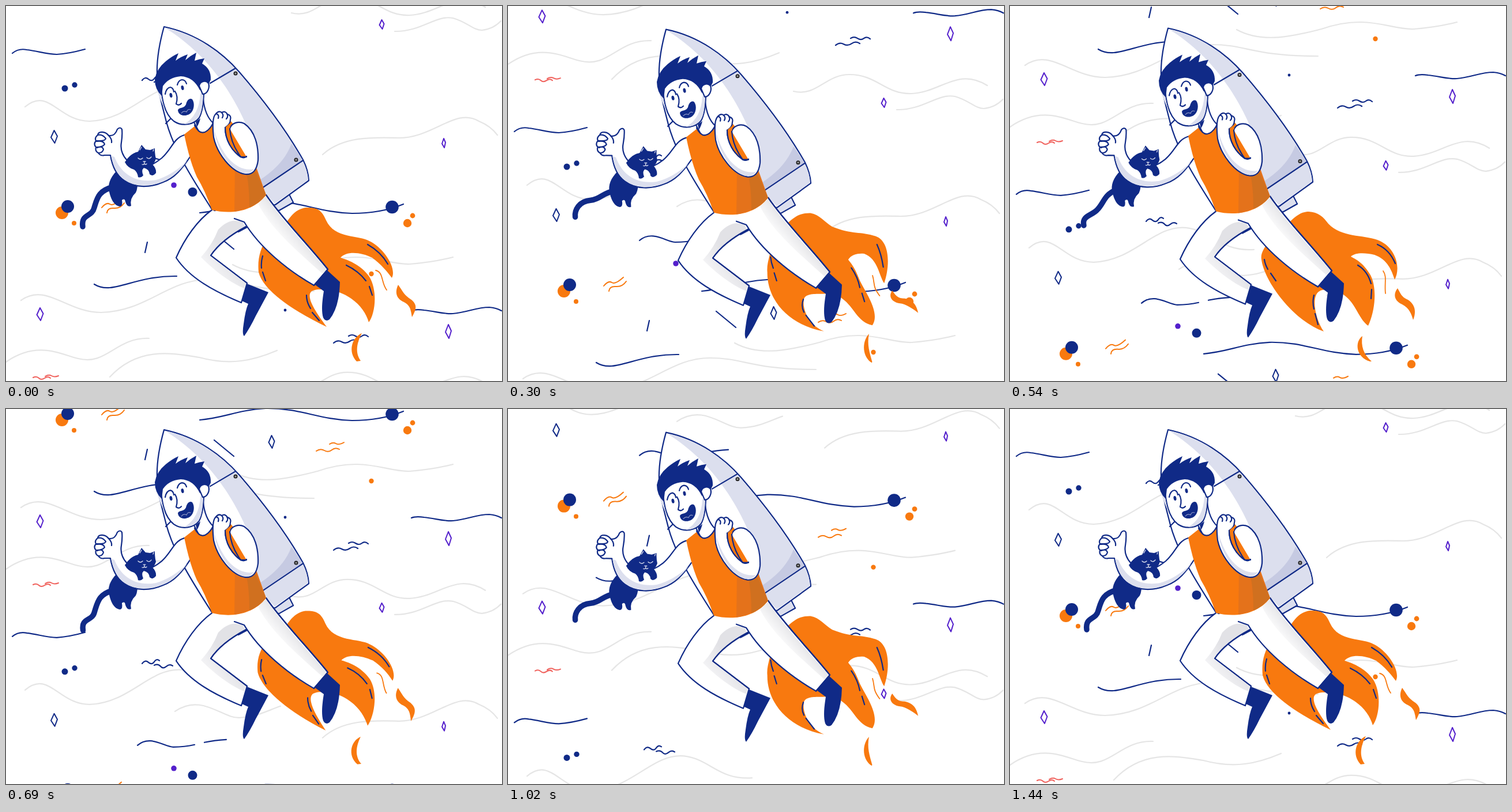
An HTML page for the animation above (1.47 s loop, 860x651 px).

```html
<!DOCTYPE html>
<html lang="en">
<head>
<meta charset="utf-8">
<title>Rocket rider</title>
<style>
  html, body { margin: 0; width: 100%; height: 100%; overflow: hidden; background: #fff; }
  svg { display: block; width: 860px; height: 651px; }
  path { stroke-linecap: round; stroke-linejoin: round; }
  .line { fill: none; stroke: #102a87; stroke-width: 2.2; }
  .skin { fill: #fff; stroke: #102a87; stroke-width: 2.2; }
  .navy { fill: #102a87; }
  .orange { fill: #f8790f; }
  .shade { fill: #dcdfee; }
  .grey { fill: none; stroke: #e5e5e5; stroke-width: 2.2; }
</style>
</head>
<body>
<svg viewBox="0 0 860 651">
  <defs>
    <linearGradient id="shin" gradientUnits="userSpaceOnUse" x1="502" y1="388" x2="476" y2="410">
      <stop stop-color="#e4e4e7"/><stop offset="1" stop-color="#fff"/>
    </linearGradient>
    <linearGradient id="knee" gradientUnits="userSpaceOnUse" x1="392" y1="440" x2="360" y2="465">
      <stop stop-color="#e2e2e6"/><stop offset="1" stop-color="#f3f3f5"/>
    </linearGradient>
  </defs>
  <g id="sky">
    <g id="tile">
      <path class="grey" d="M0 618C55 580 95 605 125 612C175 625 190 575 248 577
        M180 644C230 590 290 603 335 610C390 625 430 615 470 598
        M26 511C70 480 105 532 165 532C245 530 280 475 350 475C410 475 420 495 534 495
        M33 175C75 140 90 200 145 200C215 198 250 135 305 140C350 145 365 182 423 178
        M293 212C340 180 375 225 405 223C435 222 455 210 476 203
        M549 258C585 225 640 228 680 229C740 230 780 175 820 200Q840 208 852 224
        M495 12C535 22 550 -17 592 -17C640 -17 655 18 700 16C750 14 780 -30 831 2
        M674 44C720 45 745 15 775 21C800 28 810 42 825 42Q845 40 858 26
        M393 449C440 475 500 458 540 448C620 420 660 450 700 448Q740 445 775 436"/>
      <path class="line" d="M11 82Q22 73 36 76C55 78 70 84 88 84Q108 83 137 75
        M153 483C185 503 220 468 296 469
        M228 271C250 252 275 274 290 274Q310 274 327 270M344 266Q362 262 382 261
        M336 359C380 355 400 342 450 339C510 338 540 358 600 360Q650 360 689 344
        M703 529Q710 526 725 528C745 530 757 535 775 534C800 532 815 523 838 523Q850 524 859 529
        M245 410L241 428M361 394L395 422
        M236 129q5 -7 11 -2t10 -1t9 -2M257 132q7 -3 11 2t10 0t11 -1
        M568 585q7 -6 14 -2t14 -1t14 0M594 573q6 -4 12 0t11 0t11 1"/>
      <path fill="none" stroke="#f0625d" stroke-width="2" d="M47 645q6 -3 10 1t10 0t10 0M68 643q6 -4 11 -1t12 0"/>
      <path fill="none" stroke="#f8790f" stroke-width="2" d="M538 413q7 -5 14 -1t13 -1t13 -1M561 401q6 -4 11 -1t14 -2
        M166 350q8 -10 14 -6t20 -9M175 359q1 -9 12 -8t18 -9"/>
    </g>
  </g>

  <g class="orange">
    <path data-morph="flame"/><path data-morph="dropRight"/><path data-morph="dropLow"/>
  </g>
  <path data-morph="spark" fill="none" stroke="#f8790f" stroke-width="1.8"/>
  <path data-morph="dashes" class="line"/>

  <g data-bob>
    <path class="skin" d="M403 392L396 384L490 325L498 341Z"/>
    <path class="shade" d="M489 328L497 341L474 355L462 345Z"/>
    <path class="skin" d="M274 36C332 48 376 82 404 114C448 165 489 221 515 267Q524 285 525 303L467 345L357 353C325 303 291 250 278 201C264 145 252 115 274 36Z"/>
    <path class="shade" d="M276 38C332 49 375 83 403 115C447 166 488 222 514 268Q523 285 524 302L466 343L425 300L420 215C402 170 360 90 276 38Z"/>
    <path fill="#c6cae2" d="M495 239L514 267L446 313L440 302Q482 275 495 239Z"/>
    <path class="line" d="M354 134L398 108M515 268L444 316M277 204L289 192M498 341L470 357"/>
    <g fill="#999" stroke="#222" stroke-width="1.8"><circle cx="398" cy="117" r="2.6"/><circle cx="503" cy="267" r="2.6"/></g>

    <path class="navy" d="M415 481L455 497Q439 527 433 538Q423 559 413 573Q409 570 412 552Q415 528 420 517L407 511Z"/>
    <path class="navy" d="M556 458L579 479Q578 523 561 544Q554 549 550 541C546 528 549 508 551 495L536 484Z"/>
    <path fill="#fff" d="M357 350L451 325L440 380L396 382Z"/>
    <path class="skin" d="M357 354C332 372 310 403 295 437C318 472 360 495 408 515L418 481L355 433Q373 406 416 383"/>
    <path fill="url(#knee)" d="M354 433L416 481L413 490C392 482 364 462 338 436Q358 414 368 388Q390 365 411 376L414 383Q374 404 354 433Z"/>
    <path class="line" d="M418 481L355 433Q373 406 416 383"/>
    <path class="skin" d="M396 369L413 375C440 420 490 460 534 485L558 457C520 410 480 370 451 328"/>
    <path fill="url(#shin)" d="M451 330C475 368 515 410 556 457L549 465C506 426 458 386 437 343Z"/>
    <path class="line" d="M534 485L558 457C520 410 480 370 451 328"/>
  </g>

  <path data-morph="tail" fill="none" stroke="#102a87" stroke-width="9.5"/>
  <g id="arm">
    <path class="navy" d="M196 282C183 294 177 306 178 318C181 334 187 347 198 348Q203 347 201 337Q206 333 207 340Q210 350 217 347Q214 334 225 324Q229 316 228 300Z"/>
    <path class="navy" d="M205 272Q218 253 230 254L240 283L222 290Z"/>
    <path class="skin" d="M309 224C290 230 288 248 270 264C246 284 225 284 210 268Q197 254 200 237Q202 224 201 214Q198 209 193 214C190 223 184 226 178 225C172 217 160 217 159 224Q153 229 156 234Q151 240 156 245Q154 252 160 255Q164 261 171 259L181 259C184 277 190 293 205 303C225 317 252 315 272 306C292 299 306 282 319 262"/>
    <path class="shade" d="M182 260C186 278 192 292 206 302C225 315 252 313 272 305C290 298 303 284 314 269Q288 294 260 302C225 308 200 292 188 262Z"/>
    <path class="line" d="M159 224Q167 222 173 230Q172 235 157 234M157 235Q169 233 171 240Q168 245 157 245M158 246Q167 242 169 249Q167 255 161 255M178 225Q184 231 183 237"/>
    <path class="navy" d="M206 271Q218 255 229 253L235 241L242 249L250 250L258 247Q258 258 260 265Q258 272 254 275Q261 282 260 290Q254 297 249 292Q248 283 239 281Q234 285 238 294Q234 299 229 297Q228 288 222 284Q211 281 206 271Z"/>
    <path class="line" style="stroke:#dcdfee;stroke-width:1.3" d="M229 264q4 4 8 0M244 263q4 4 8 -1M238 270h4M240 271v3q-2 2 -4 1m4 -1q2 2 4 0M232 250l3 -5M255 252l1 -3"/>
  </g>

  <g data-bob>
    <path class="skin" d="M342 162Q345 190 359 203Q350 224 335 219L326 202Z"/>
    <path class="navy" d="M329 201L337 195Q335 204 331 210Z"/>
    <path class="orange" d="M309 223L328 208Q341 231 358 206L390 200L414 230L434 288L451 328C428 358 388 362 357 354Q345 320 331 297Q318 268 309 223Z"/>
    <path fill="#e4721b" d="M397 280H434L451 328Q428 352 396 357Z"/>
    <path fill="#d0701f" d="M416 287L433 287L451 328Q439 343 422 350Q422 310 416 287Z"/>
    <path class="line" d="M327 207Q340 233 358 206"/>

    <path class="skin" d="M388 213C391 203 403 199 413 204C432 217 438 243 437 268C435 284 429 293 415 292C390 288 366 256 360 228C358 210 358 192 364 187Q369 181 374 185Q380 181 384 188Q391 190 389 197Q389 206 380 211C380 232 391 251 407 262L417 262"/>
    <path class="shade" d="M361 215C365 250 388 284 411 290Q424 292 430 283Q407 288 385 264Q369 244 361 215Z"/>
    <path class="orange" d="M380 211L390 202L388 213C389 229 396 247 407 262C391 251 380 232 380 211Z"/>
    <path class="line" d="M388 213C389 229 396 247 407 262M380 211C380 232 391 251 407 262Q413 265 417 261M364 187q6 1 4 8M374 185q4 4 1 9M383 187q3 5 -1 9"/>

    <path class="skin" d="M268 135C270 160 274 187 291 200C306 210 326 206 335 194Q342 181 343 151L330 118H285Z"/>
    <path class="shade" d="M337 152L342 151Q341 184 334 193Q324 205 309 205Q335 190 337 152Z"/>
    <path class="shade" d="M261 142L269 151Q270 164 275 178Q266 162 261 142Z"/>
    <path class="navy" d="M270 156Q258 145 258 127Q261 109 277 96Q288 87 299 82L294 95Q303 88 315 84L311 94Q320 86 330 81L327 95Q335 92 344 91L340 100Q356 109 355 128L350 138L336 146Q325 123 303 122Q282 124 272 139Z"/>
    <path class="skin" d="M335 139C336 131 346 128 351 134C354 142 349 153 341 153Z"/>
    <path class="line" d="M276 153Q278 142 285 141Q290 142 291 149M297 137Q299 129 305 128Q311 128 313 135M293 148Q299 157 295 170Q300 174 304 169"/>
    <g class="navy">
      <ellipse cx="286" cy="155" rx="2.4" ry="4" transform="rotate(-12 286 155)"/>
      <ellipse cx="306" cy="142" rx="2.4" ry="4" transform="rotate(-12 306 142)"/>
      <path d="M298 181C300 175 308 179 312 171C314 162 319 159 323 162C328 169 326 182 319 187C310 193 299 190 298 181Z"/>
    </g>
    <path fill="none" stroke="#8d97c6" stroke-width="1.2" d="M304 186Q308 181 313 184Q315 178 320 180"/>
  </g>
</svg>

<script>
const NAVY = '#102a87', ORANGE = '#f8790f', PURPLE = '#5420cc';
const STEP = 30, LOOP = 1470, SCROLL = 13.6, TILE = SCROLL * 48;
const $ = q => document.querySelector(q);
const $$ = q => [...document.querySelectorAll(q)];

function add(parent, name, attrs) {
  const el = document.createElementNS('http://www.w3.org/2000/svg', name);
  for (const key in attrs) el.setAttribute(key, attrs[key]);
  return parent.appendChild(el);
}
const dot = (cx, cy, r, fill) => add($('#tile'), 'circle', { cx, cy, r, fill });
const diamond = (x, y, w, h, stroke) => add($('#tile'), 'path', {
  d: `M${x} ${y - h}L${x + w} ${y - 1}L${x + 1} ${y + h}L${x - w} ${y + 1}Z`,
  fill: 'none', stroke, 'stroke-width': 2
});

dot(97, 359, 11, ORANGE); dot(107, 348, 11, NAVY); dot(118, 377, 4, ORANGE);
dot(102, 143, 5.5, NAVY); dot(119, 137, 4.7, NAVY);
dot(323.5, 323, 8, NAVY); dot(291, 311, 4.8, PURPLE); dot(484, 528, 2.4, NAVY);
dot(669.5, 349, 11.3, NAVY); dot(696, 377, 7.2, ORANGE); dot(705, 364, 4.4, ORANGE); dot(633.5, 465, 4.2, ORANGE);
diamond(651.5, 32, 4, 8, PURPLE); diamond(759, 238, 3, 8, PURPLE);
diamond(59, 535, 5.5, 11, PURPLE); diamond(767, 565, 5, 12, PURPLE);
diamond(83.5, 227, 5.5, 11, NAVY); diamond(460.5, 397, 5, 11, NAVY);
for (const y of [-TILE, TILE]) add($('#sky'), 'use', { href: '#tile', y });

// Each shape at 0, 90 and 270 degrees of its swing.
const poses = {
  flame: [
    'M455 400C440 420 436 440 438 462C446 495 500 530 556 557C540 535 518 505 530 495C540 490 550 493 560 492C600 500 622 525 629 549C640 535 645 495 630 470C615 448 590 440 580 437C590 425 615 427 635 437C650 448 660 460 669 472C678 455 655 420 630 408C612 397 570 405 555 372C546 350 535 350 520 350C505 352 495 362 487 375Z',
    'M460 400C455 425 447 450 449 475C452 515 490 540 556 559C530 545 508 520 514 505C520 495 545 500 560 498C600 505 615 535 636 550C650 535 625 495 615 475C605 455 590 448 582 441C590 428 610 428 622 434C640 445 645 468 656 478C664 455 655 412 632 402C612 392 590 400 563 378C550 362 540 356 525 354C505 355 495 365 485 378Z',
    'M452 405C440 420 434 430 436 440C440 475 488 545 544 565C530 545 523 510 533 498C540 490 550 493 560 492C600 505 600 540 621 555C633 530 637 490 625 467C612 445 600 440 591 435C598 428 615 428 632 432C655 440 662 460 667 475C679 452 667 417 637 406C612 397 575 402 552 378C543 366 535 358 518 357C505 357 495 365 485 375Z'
  ],
  dropRight: [
    'M680 484C674 496 676 508 690 514C702 520 702 530 704 540C713 524 712 518 703 510C690 502 688 495 680 484Z',
    'M673 489C667 500 672 512 690 514C700 517 708 525 713 531C714 520 713 513 698 508C685 505 682 501 673 489Z',
    'M672 490C664 500 666 512 680 518C693 525 696 535 699 545C705 530 702 518 690 510C678 505 677 498 672 490Z'
  ],
  dropLow: [
    'M617 568C600 575 592 600 608 617L615 616C605 602 608 585 617 568Z',
    'M628 566C612 578 607 603 618 619L622 617C619 600 620 585 628 566Z',
    'M611 573C597 583 600 610 624 617L627 617C613 605 608 590 611 573Z'
  ],
  spark: [
    'M641 459C655 462 650 480 660 493',
    'M630 466C640 475 635 485 652 498',
    'M647 460C654 470 649 480 651 499'
  ],
  dashes: [
    'M445 434Q442 444 443 455M445 462L450 477M627 414Q650 427 662 448M590 450Q611 460 624 477M630 487L635 502M521 502Q521 514 528 525M531 532L543 546',
    'M456 432Q454 443 455 454M455 462L457 477M632 414Q643 432 649 453M587 454Q602 469 611 484M618 494L626 508M510 508Q508 520 516 530M520 535L538 550',
    'M441 440Q442 448 447 457M452 464L461 477M637 414Q658 423 668 447M603 450Q620 460 626 482M627 492L626 508M527 502Q524 514 527 526M529 534L534 553'
  ],
  tail: [
    'M187 314C160 320 158 334 153 350C149 367 130 360 133 383',
    'M186 317C163 318 157 331 146 337C131 345 121 353 122 370',
    'M183 320C163 328 163 342 151 354C142 364 124 364 128 381'
  ]
};

// Harmonic blend that passes through the three poses.
function morph([rest, quarter, last], angle) {
  const c = Math.cos(angle), s = Math.sin(angle), number = /-?\d+/g;
  const a = quarter.match(number), b = last.match(number);
  let i = 0;
  return rest.replace(number, n => {
    const value = n * c + a[i] * (1 - c + s) / 2 + b[i] * (1 - c - s) / 2;
    i++;
    return value.toFixed(2);
  });
}

const morphing = $$('[data-morph]'), bobbing = $$('[data-bob]');

function draw(now) {
  const step = Math.floor(now % LOOP / STEP);
  const angle = step * Math.PI / 12;
  const bob = 2.5 * (1 - Math.cos(angle));
  $('#sky').setAttribute('transform', `translate(0 ${step * SCROLL % TILE})`);
  for (const el of bobbing) el.setAttribute('transform', `translate(0 ${bob})`);
  $('#arm').setAttribute('transform', `translate(0 ${bob}) rotate(${bob * .38} 312 230)`);
  for (const el of morphing) el.setAttribute('d', morph(poses[el.dataset.morph], angle));
}

const start = performance.now();
function tick() {
  draw(performance.now() - start);
  requestAnimationFrame(tick);
}
tick();
</script>
</body>
</html>
```
